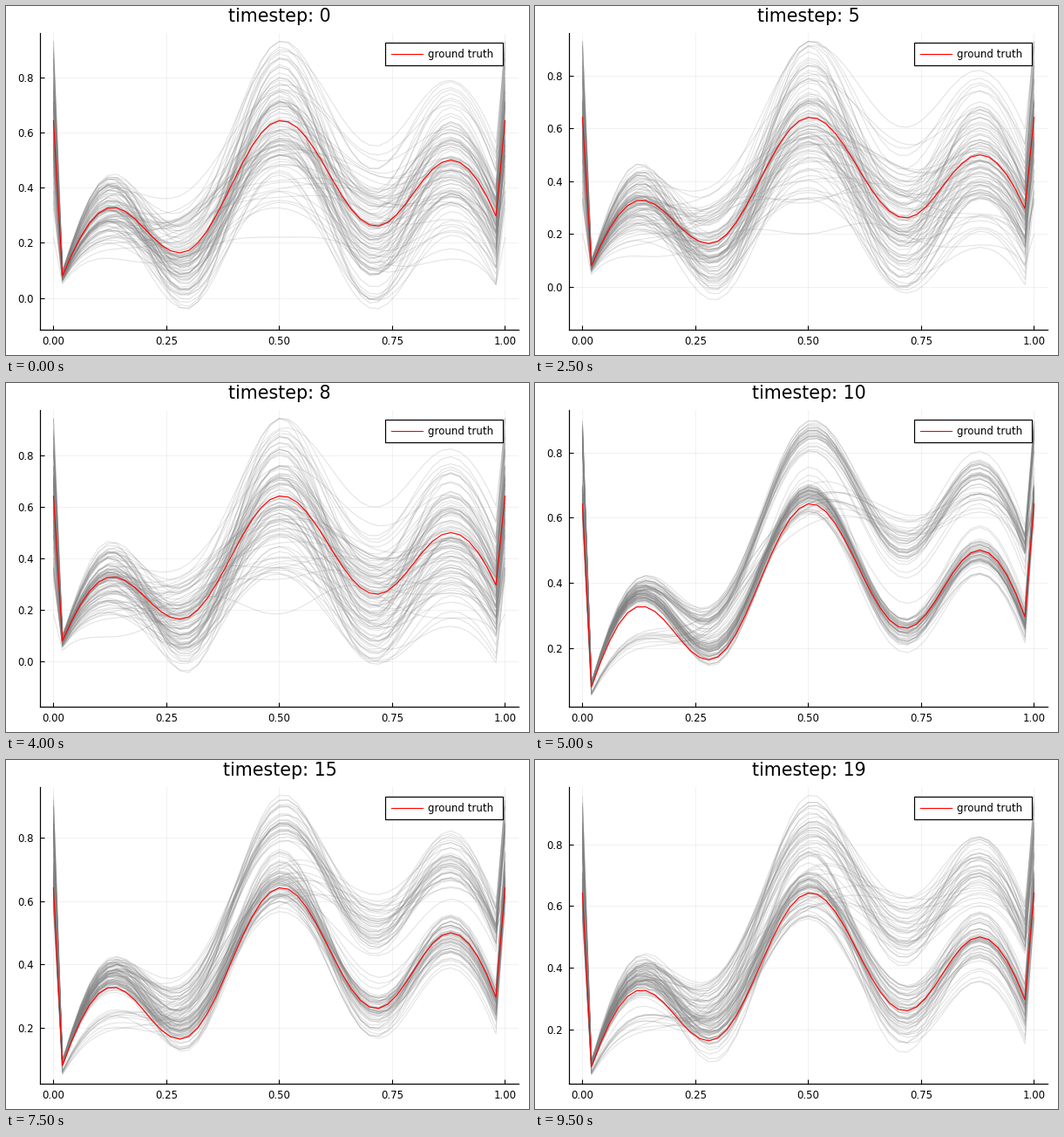
A matplotlib script for the animation above (10000 ms loop, 600 by 400 pixels).

```python
import numpy as np
import matplotlib.pyplot as plt
from matplotlib.animation import FuncAnimation
from matplotlib.collections import LineCollection
from matplotlib.patches import Rectangle

W, H, DPI = 600, 400, 100
PT = 72 / DPI  # points per pixel
STEPS, MEMBERS, RESAMPLE_STEP = 20, 100, 10
TOP, BOTTOM, RIGHT = 31, 371, 588

plt.rcParams["font.family"] = "DejaVu Sans"
rng = np.random.default_rng(8)
x = np.linspace(0, 1, 51)


def cosine_curve(x, turns):
    """Join the turning points with half cosine waves."""
    tx, ty = np.transpose(turns)
    phase = np.interp(x, tx, np.arange(len(tx)))
    i = np.minimum(phase.astype(int), len(tx) - 2)
    ease = (1 - np.cos(np.pi * (phase - i))) / 2
    return ty[i] + (ty[i + 1] - ty[i]) * ease


def tie_ends(curves):
    """Both ends take the value of the middle."""
    curves[..., [0, -1]] = curves[..., [25]]
    return curves


truth = tie_ends(cosine_curve(x, [(-.17, -.51), (.13, .328), (.28, .163), (.505, .643),
                                  (.715, .26), (.88, .5), (1.24, -.64)]))

# Deviation modes: level, wave height, tilt
modes = tie_ends(np.array([
    np.sin(2.1 * x),
    .2 * np.sqrt(np.abs(np.sin(np.pi * x))) * np.cos(5 * np.pi * (x - .5)),
    -np.cos(np.pi * x) * (1 - np.exp(-8 * x)),
]))


def data_range(step):
    since = step - RESAMPLE_STEP
    if since < 0:
        return -.085 - .021 * np.sqrt(step), .93 + .038 * np.exp(-(step - 7) ** 2)
    return .045 + .0007 * since, .905 + .006 * since


def noise(*scale):
    return np.clip(rng.normal(size=(MEMBERS, 3)), -2.1, 2.1) * scale


def random_walk():
    """Ensemble parameters per step, resampled into three clusters midway."""
    clusters = np.array([(.02, .05, -.04), (.235, .05, 0), (.13, -.6, .11)])
    state = noise(.135, .42, .025)
    for step in range(STEPS):
        if step == RESAMPLE_STEP:
            picks = rng.choice(3, MEMBERS, p=[.65, .28, .07])
            state = clusters[picks] + noise(.025, .1, .018)
        elif step:
            state = state + noise(.013, .06, .007)
        yield state


def ensemble(step, state):
    """Curves around the truth, shrunk where they would leave the data range."""
    low, high = data_range(step)
    offset = state @ modes
    room = np.where(offset > 0, high - truth, truth - low)
    fit = np.min(room / np.maximum(np.abs(offset), 1e-9), axis=1, keepdims=True)
    return truth + offset * np.minimum(1, fit)


curves = [ensemble(step, state) for step, state in enumerate(random_walk())]

fig = plt.figure(figsize=(W / DPI, H / DPI), dpi=DPI, facecolor="white")
ax = fig.add_axes([0, 0, 1, 1])
ax.set_xlim(-.03, 1.03)
ax.set_xticks(np.linspace(0, 1, 5))
ax.xaxis.set_major_formatter("{x:.2f}")
ax.spines[["top", "right"]].set_visible(False)
ax.spines[["left", "bottom"]].set_linewidth(1.2 * PT)
ax.tick_params(direction="in", length=5 * PT, width=1.1 * PT, pad=7.3 * PT,
               labelsize=11.8 * PT)
ax.set_axisbelow(True)
ax.grid(color="black", alpha=.07, linewidth=.8 * PT)

members = LineCollection([], colors="gray", alpha=.22, linewidths=1.1 * PT, zorder=2)
ax.add_collection(members, autolim=False)
ax.plot(x, truth, color="red", linewidth=1.15 * PT, zorder=3)

# Title and legend live on a pixel overlay
overlay = fig.add_axes([0, 0, 1, 1], zorder=5)
overlay.set(xlim=(0, W), ylim=(H, 0))
overlay.axis("off")
title = overlay.text(0, 18, "", ha="center", va="baseline", fontsize=20.7 * PT)
box = overlay.add_patch(Rectangle((0, 42), 0, 26, facecolor="white", edgecolor="black",
                                  linewidth=1.2 * PT))
key, = overlay.plot([], [], color="red", linewidth=1.15 * PT)
label = overlay.text(0, 59.5, "ground truth", va="baseline", fontsize=11.8 * PT)


def update(step):
    low, high = data_range(step)
    pad = .03 * (high - low)
    wide = high + pad > 1
    left, shift = (46.6, .8) if wide else (38.9, 0)

    ax.set_position([left / W, 1 - BOTTOM / H, (RIGHT - left) / W, (BOTTOM - TOP) / H])
    ticks = np.linspace(0, 1, 5 if wide else 6)
    ax.set_yticks([t for t in ticks if low - pad <= t <= high + pad])
    ax.yaxis.set_major_formatter("{x:.2f}" if wide else "{x:.1f}")
    ax.set_ylim(low - pad, high + pad)
    members.set_segments([np.column_stack([x, y]) for y in curves[step]])

    title.set_text(f"timestep: {step}")
    title.set_x((left + RIGHT) / 2 + .5)
    box.set_x(434.8 + shift)
    box.set_width(134.7 - shift)
    key.set_data([442 + shift, 478 + shift], [55, 55])
    label.set_x(483.5 + shift)


animation = FuncAnimation(fig, update, frames=STEPS, interval=500, repeat=True,
                          repeat_delay=0, init_func=lambda: update(0))
plt.show()
```
